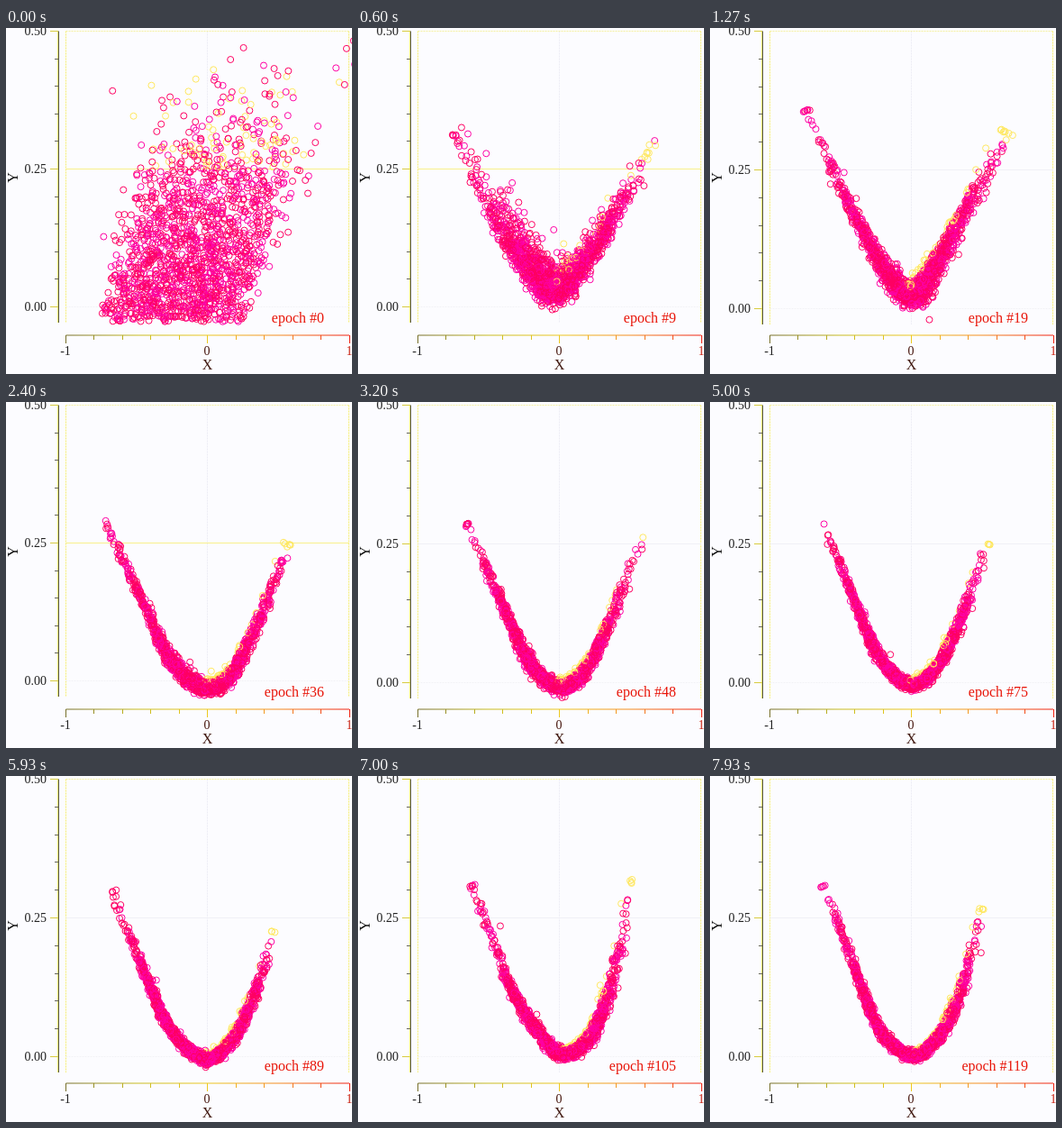
Write an HTML page with a canvas that moves like this. It is 384 by 384 pixels and loops after 8000 ms.

```html
<!DOCTYPE html>
<html lang="en">
<head>
<meta charset="utf-8">
<title>Training epochs</title>
<style>
  html, body { margin: 0; width: 100%; height: 100%; overflow: hidden; background: #fcfcff; }
  canvas { display: block; }
</style>
</head>
<body>
<canvas id="plot" width="384" height="384"></canvas>
<script>
const ctx = document.getElementById('plot').getContext('2d');
const LOOP = 8000, EPOCHS = 120, POINTS = 1700;
const SERIF = '"Liberation Serif", serif';
const LEFT = 66.5, MID = 223.5, RIGHT = 381, TOP = 3.5;

// Spline through the point band, and its spread at left end, valley and right end
const shapes = [
  { at: 19, spread: [2.6, 6.5, 4.2],
    path: [106,90, 130,143, 160,207, 195,268, 223,298, 246,270, 276,218, 303,166, 330,114] },
  { at: 36, spread: [2, 4.2, 2.6],
    path: [109,127, 128,170, 155,227, 184,288, 220,317, 250,302, 274,256, 295,204, 313,156] },
  { at: 61, spread: [1.8, 3, 2.6],
    path: [135,141, 152,186, 172,235, 194,285, 222,314, 252,296, 277,248, 298,192, 319,140] },
  { at: 89, spread: [1.8, 2.8, 2.5],
    path: [117,127, 136,174, 158,228, 182,281, 220,314, 250,294, 271,253, 286,212, 298,172] },
  { at: 105, spread: [1.9, 3, 3.2],
    path: [126,120, 147,175, 170,236, 198,281, 226,309, 256,291, 276,247, 290,190, 304,112] },
  { at: 119, spread: [1.8, 2.6, 3],
    path: [125,121, 144,166, 164,222, 190,284, 224,310, 253,290, 276,246, 290,198, 302,146] }
];

const mix = (a, b, k) => a + (b - a) * k;
const mixAll = (a, b, k) => a.map((v, i) => mix(v, b[i], k));
const clamp = (v, lo, hi) => Math.min(hi, Math.max(lo, v));

function randomizer(seed) {
  let state = seed * 7919 + 12345;
  return () => {
    state = (state + 0x6D2B79F5) | 0;
    let n = Math.imul(state ^ (state >>> 15), 1 | state);
    n = (n + Math.imul(n ^ (n >>> 7), 61 | n)) ^ n;
    return ((n ^ (n >>> 14)) >>> 0) / 4294967296;
  };
}

function shapeAt(epoch) {
  const e = Math.max(epoch, shapes[0].at);
  const i = Math.max(1, shapes.findIndex(s => s.at >= e));
  const a = shapes[i - 1], b = shapes[i];
  const k = (e - a.at) / (b.at - a.at);
  return { path: mixAll(a.path, b.path, k), spread: mixAll(a.spread, b.spread, k) };
}

// Catmull-Rom position and slope at s in 0..1
function along(path, s) {
  const last = path.length / 2 - 1;
  const i = Math.min(last - 1, Math.floor(s * last)), t = s * last - i;
  const axis = o => {
    const at = n => path[clamp(n, 0, last) * 2 + o];
    const p = at(i - 1), q = at(i), r = at(i + 1), w = at(i + 2);
    const b = (r - p) / 2, c = p - 2.5 * q + 2 * r - w / 2, d = (3 * q - 3 * r + w - p) / 2;
    return [q + t * (b + t * (c + t * d)), b + t * (2 * c + 3 * t * d)];
  };
  const [x, dx] = axis(0), [y, dy] = axis(1);
  return { x, y, dx, dy };
}

function line(x1, y1, x2, y2, color, dash = []) {
  ctx.strokeStyle = color;
  ctx.setLineDash(dash);
  ctx.beginPath();
  ctx.moveTo(x1, y1);
  ctx.lineTo(x2, y2);
  ctx.stroke();
  ctx.setLineDash([]);
}

function text(str, x, y, size, color, align = 'center') {
  ctx.font = `${size}px ${SERIF}`;
  ctx.fillStyle = color;
  ctx.textAlign = align;
  ctx.fillText(str, x, y);
}

function drawAxes(low) {
  const zero = low ? 309.5 : 311.5, bottom = low ? 327 : 329;
  const half = (TOP + zero) / 2;

  for (const x of [LEFT, RIGHT - 0.5]) line(x, TOP, x, bottom, '#f6ee70', [2, 1]);
  line(MID, TOP, MID, bottom, '#ececf4', [2, 1]);
  line(LEFT, TOP, RIGHT, TOP, '#f4f0a0', [2, 1]);
  line(LEFT, half, RIGHT, half, low ? '#f8f08c' : '#f0f0f6');
  line(LEFT, zero, RIGHT, zero, '#f2f2f6', [2, 1]);

  line(57.5, TOP, 57.5, bottom, '#f4ec70');
  line(58.5, TOP, 58.5, bottom, '#55554a');
  for (let i = 0; i <= 10; i++) {
    const y = Math.round(mix(zero, TOP, i / 10) - 0.5) + 0.5;
    const major = i % 5 === 0;
    line(major ? 49 : 54, y, 58, y, major ? '#d8cc40' : '#66665a');
  }
  ['0.00', '0.25', '0.50'].forEach((label, i) =>
    text(label, 45, mix(zero, TOP, i / 2) + 4, 14, '#222', 'right'));

  const warm = ctx.createLinearGradient(LEFT, 0, RIGHT, 0);
  ['#77702a', '#c8bc20', '#ecc820', '#f48c20', '#f02010'].forEach((c, i) => warm.addColorStop(i / 4, c));
  line(LEFT, 341, RIGHT, 341, warm);
  for (let i = 0; i <= 10; i++) {
    const x = Math.round(mix(LEFT, RIGHT, i / 10) - 0.5) + 0.5;
    line(x, 341, x, i % 5 ? 346 : 350, warm);
  }
  text('-1', 66, 363, 14, '#222');
  text('0', 223, 363, 14, '#481810');
  text('1', 381, 363, 14, '#c82010');
  text('X', 223.5, 379, 16, '#401810');
  ctx.save();
  ctx.translate(13, 166);
  ctx.rotate(-Math.PI / 2);
  text('Y', 0, 0, 16, '#111');
  ctx.restore();
}

function drawPoints(epoch, low) {
  const random = randomizer(epoch + 1);
  const gauss = () => Math.sqrt(-2 * Math.log(1 - random())) * Math.cos(2 * Math.PI * random());
  const { path, spread } = shapeAt(epoch);
  const settled = 1 - (1 - Math.min(1, epoch / 15)) ** 2;

  for (let n = 0; n < POINTS; n++) {
    const g = clamp(gauss(), -2.9, 2.9);
    const height = Math.abs(50 + 100 * gauss());
    const cloudX = 185 + 0.3 * height + 85 * Math.tanh(g / 1.5) + gauss() * height * 0.13;
    const cloudY = 326 - height;

    const s = 0.5 + g * 0.17;
    const p = along(path, s);
    const sigma = s < 0.5 ? mix(spread[0], spread[1], Math.max(0, s * 4 - 1))
                          : mix(spread[2], spread[1], Math.max(0, 3 - s * 4));
    const noise = gauss() * (random() < 0.01 ? 2 : 1);
    const off = noise * sigma / Math.hypot(p.dx, p.dy);

    const x = mix(cloudX, p.x + p.dy * off, settled);
    let y = mix(cloudY, p.y - p.dx * off, settled);
    if (low) y = 326 - Math.abs(326 - y);

    const pale = settled < 0.5 ? height > 170 && random() < 0.3
                               : s > 0.5 && noise > 1.7 || s > 0.97;
    ctx.strokeStyle = pale ? '#ffe860' : random() < 0.55 ? '#ff0062' : '#ff00a4';
    ctx.beginPath();
    ctx.arc(x, y, 3.5, 0, 2 * Math.PI);
    ctx.stroke();
  }
}

function draw(epoch) {
  const low = epoch < 12 || (epoch > 26 && epoch < 47);
  ctx.lineWidth = 1;
  ctx.fillStyle = '#fcfcff';
  ctx.fillRect(0, 0, 384, 384);
  drawAxes(low);
  drawPoints(epoch, low);
  text(`epoch #${epoch}`, 353, 327, 16, '#e81408', 'right');
}

const start = performance.now();
let shown = -1;
function tick() {
  const time = (performance.now() - start) % LOOP;
  const epoch = Math.floor((time + 4) * EPOCHS / LOOP) % EPOCHS;
  if (epoch !== shown) draw(shown = epoch);
  requestAnimationFrame(tick);
}
tick();
</script>
</body>
</html>
```
